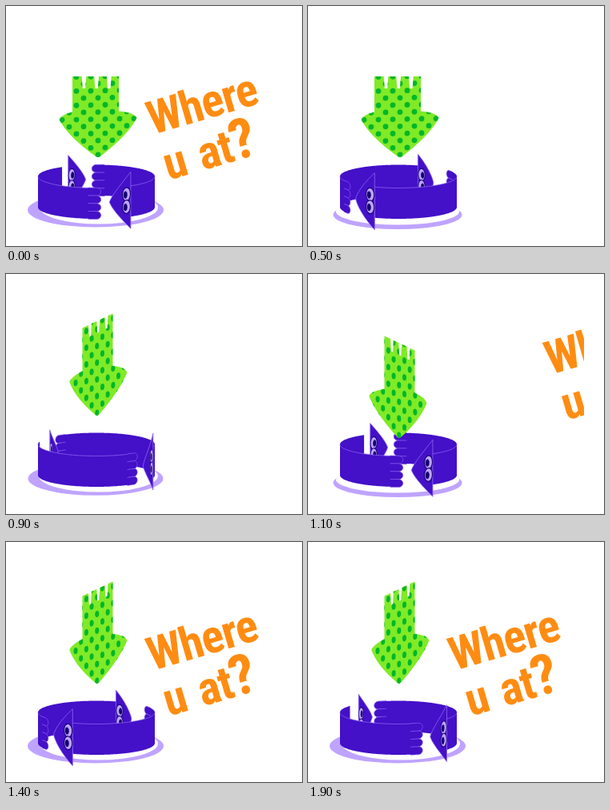
Write an HTML page with a canvas that moves like this. It is 370 px wide and 300 px high and loops after 2000 ms.

```html
<!DOCTYPE html>
<html lang="en">
<head>
<meta charset="utf-8">
<title>Where u at?</title>
<style>
  html, body { margin: 0; width: 100%; height: 100%; overflow: hidden; background: #fff; }
  canvas, svg { position: absolute; left: 0; top: 0; display: block; }
  svg { overflow: hidden; }
  text {
    font: 800 58px "Roboto Condensed", Roboto, "Liberation Sans", sans-serif;
    font-stretch: 75%;
    letter-spacing: -0.02em;
    word-spacing: 0.09em;
    fill: #ff8c12;
  }
  .big { font-size: 70px; }
</style>
</head>
<body>
<canvas width="370" height="300"></canvas>
<svg width="345" height="300" viewBox="0 0 345 300">
  <g id="words">
    <text transform="translate(183 161) rotate(-16.3)">Where</text>
    <text transform="translate(203 218) rotate(-16.3)">u at<tspan class="big">?</tspan></text>
  </g>
</svg>
<script>
const STEP = 100, STEPS = 20;
const PURPLE = '#4410c8', LINE = '#9068f2', LILAC = '#bfa3ff', NAVY = '#150070';
const GREEN = '#80ea27', DOT = '#00b728';
const TIP_HEIGHTS = [189, 205, 181, 163, 177];
const ctx = document.querySelector('canvas').getContext('2d');
const words = document.getElementById('words');
const rad = deg => deg * Math.PI / 180;

function sample(count, fn) {
  return Array.from({ length: count + 1 }, (_, i) => fn(i / count));
}

function ellipse(x, y, rx, ry, fill) {
  ctx.beginPath();
  ctx.ellipse(x, y, rx, ry, 0, 0, 7);
  ctx.fillStyle = fill;
  ctx.fill();
}

function trace(points) {
  ctx.beginPath();
  points.forEach(p => ctx.lineTo(p[0], p[1]));
}

function outline(color, width = 0.8) {
  ctx.strokeStyle = color;
  ctx.lineWidth = width;
  ctx.stroke();
}

function shape(points, fill, line) {
  trace(points);
  ctx.closePath();
  ctx.fillStyle = fill;
  ctx.fill();
  if (line) outline(line);
}

// Point on the upright ring: angle around it, height below its top rim.
const onRing = (deg, v, radius = 73) =>
  [113 + radius * Math.cos(rad(deg)), 213 + 14.5 * Math.sin(rad(deg)) + v];
const inFront = deg => Math.sin(rad(deg)) >= 0;

function drawBody(turn, front) {
  const angles = sample(141, k => turn - 87 + 141 * k).filter(a => inFront(a) === front);
  if (angles.length < 2) return;
  const top = angles.map(a => onRing(a, 0));
  const bottom = angles.map(a => onRing(a, 38.5)).reverse();
  shape([...top, ...bottom], PURPLE);
  if (front) {
    trace(top);
    outline(LINE);
  }
}

function drawToes(turn, front) {
  if (inFront(turn - 88) !== front) return;
  for (let i = 0; i < 4; i++) {
    const mid = 4.7 + i * 9.8;
    const bump = sample(16, k => {
      const a = rad(-90 + 180 * k);
      return onRing(turn - 90 - 4.5 * Math.cos(a), mid + 5 * Math.sin(a));
    });
    const toe = [onRing(turn - 82, mid - 5), ...bump, onRing(turn - 82, mid + 5)];
    shape(toe, PURPLE);
    trace(toe);
    outline(LINE, 0.6);
  }
}

function drawHead(turn, front) {
  if (inFront(turn + 62) !== front) return;
  const radius = front ? 73 : 60;
  const size = front ? 1 : 0.92;
  const at = (deg, v) => onRing(turn + deg, 18 + v * size, radius);
  const face = sample(40, k => {
    const s = 2 * k - 1;
    return at(54 + 23 * (1 - Math.abs(s) ** 1.3), 35.5 * s);
  });
  shape(face, PURPLE, LINE);
  const oval = (deg, v, w, h, fill) => shape(sample(24, k => {
    const a = rad(360 * k);
    return at(deg + w * Math.cos(a), v + h * Math.sin(a));
  }), fill);
  for (const v of [-8, 7.5]) {
    oval(59, v, 5, 9, NAVY);
    oval(59, v, 4, 7.8, LILAC);
    oval(60.2, v + 0.5, 2.2, 4.6, NAVY);
  }
}

function drawRing(turn) {
  for (const front of [false, true]) {
    for (const part of [drawBody, drawToes, drawHead]) {
      part(turn, front);
      part(turn + 180, front);
    }
  }
}

// The lilac disc shrinks to a thin rim once every six steps.
function drawShadow(n) {
  const k = (Math.max(0, n % 6 - 2) / 3) ** 2;
  ellipse(112, 255 + 6 * k, 85 - 4.5 * k, 21.5 - 3.5 * k, LILAC);
  ellipse(116 - 4 * k, 252 + 5 * k, 74 + 3 * k, 20.5 - 4 * k, '#fff');
}

// Half a spin takes five steps; the arrow is shorter when it faces us.
function drawArrow(phase) {
  const facing = Math.abs(Math.cos(rad(36 * phase)));
  const lean = Math.sin(rad(72 * phase));
  const flat = facing ** 12;
  const ratio = facing ** 1.4;
  const tip = { x: 113.7 + 1.3 * flat, y: TIP_HEIGHTS[phase] };
  const length = 120 - 19 * flat;
  const shaft = 29 * facing ** 2, head = 48.5 * ratio;
  const shaftX = tip.x + 1 - 4 * flat, headX = tip.x - 1.5 * lean;
  const slope = 0.15 * lean - 0.02;

  const top = (u, down = 0) =>
    [shaftX + shaft * u, tip.y - length + 0.5 * lean * shaft * u + down];
  const foot = side => [shaftX + shaft * side, tip.y - 59 + 2 * flat + slope * shaft * side];
  const corner = (side, inset, down) =>
    [headX + head * side * (1 - inset), tip.y - 50 + slope * head * side + down];
  const line = p => ctx.lineTo(...p);
  const curve = (c, p) => ctx.quadraticCurveTo(...c, ...p);

  ctx.save();
  ctx.beginPath();
  line(top(-1));
  if (shaft > 5) {
    for (const u of [-0.56, -0.02, 0.52]) {
      line(top(u - 0.04));
      line(top(u, 15));
      line(top(u + 0.12, 15));
      line(top(u + 0.16));
    }
  }
  line(top(1));
  line(foot(1));
  curve(corner(1, 0.06, -5), corner(1, 0, 2));
  curve(corner(1, 0.22, 23), [tip.x + head * 0.06, tip.y - 1]);
  curve([tip.x, tip.y + 1], [tip.x - head * 0.06, tip.y - 1]);
  curve(corner(-1, 0.22, 23), corner(-1, 0, 2));
  curve(corner(-1, 0.06, -4), foot(-1));
  ctx.closePath();
  ctx.fillStyle = GREEN;
  ctx.fill();
  ctx.clip();

  ctx.transform(ratio, slope * ratio, 0, length / 101, tip.x, tip.y);
  for (let row = 0; row < 14; row++) {
    for (let col = -4; col <= 4; col++) {
      ellipse(col * 18 + (row % 2) * 9, -3 - row * 8.9, 3.4, 3.4, DOT);
    }
  }
  ctx.restore();
}

function placeWords(n) {
  const shown = n === 0 || n >= 11;
  words.setAttribute('visibility', shown ? 'visible' : 'hidden');
  words.setAttribute('transform', n === 11 ? 'translate(120 -35)' : 'translate(0 0)');
}

let last = -1;
function render(now) {
  const n = Math.floor(now / STEP) % STEPS;
  if (n === last) return;
  last = n;
  ctx.fillStyle = '#fff';
  ctx.fillRect(0, 0, 370, 300);
  drawShadow(n);
  drawRing(20 * Math.max(0, n - 2));
  drawArrow(n % 5);
  placeWords(n);
}

const start = performance.now();
function tick() {
  render(performance.now() - start);
  requestAnimationFrame(tick);
}
tick();
</script>
</body>
</html>
```
